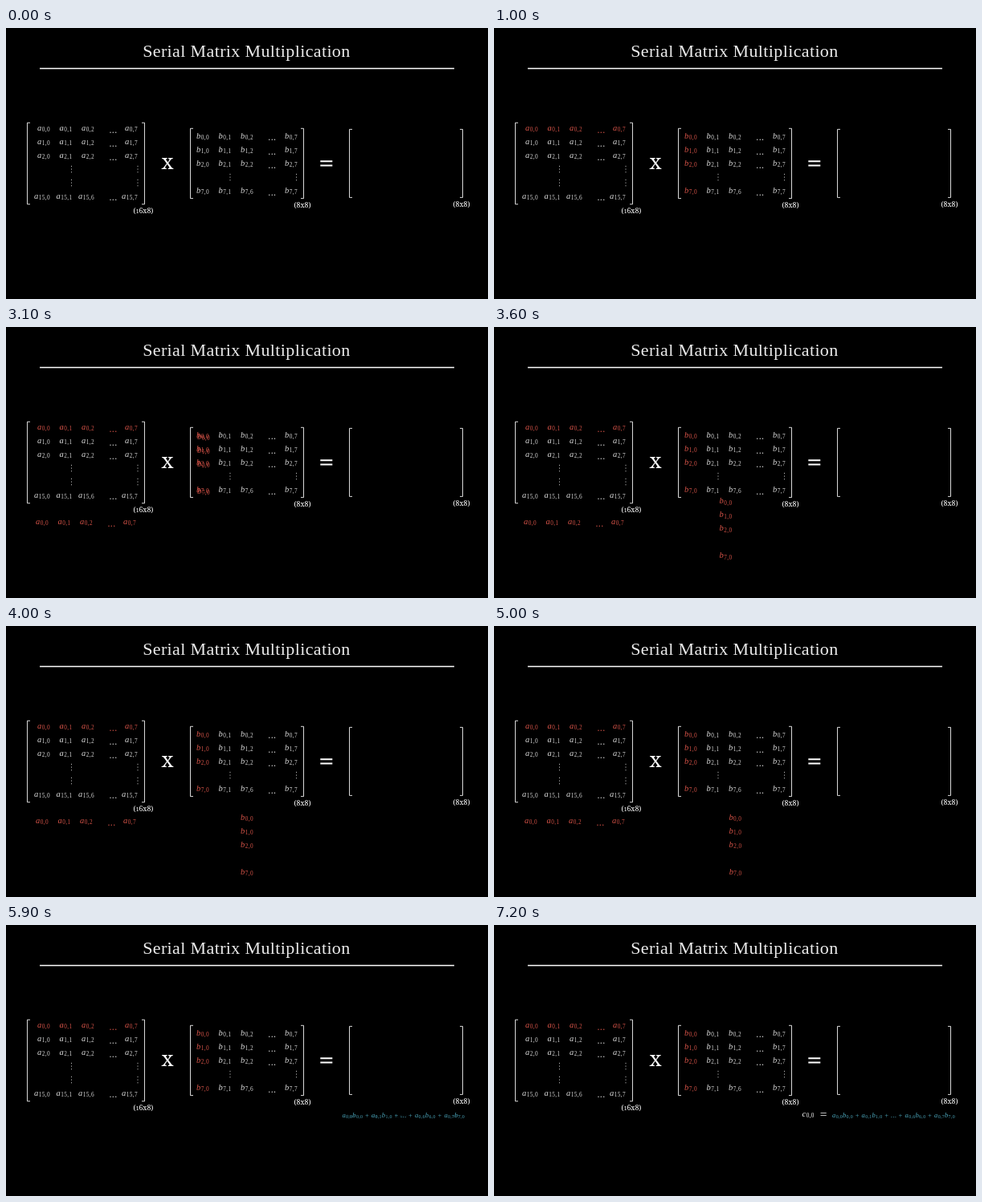
Recreate the animation shown at these times as an HTML page. Size 600 px wide and 338 px high, loop 8 s.

```html
<!DOCTYPE html>
<html lang="en">
<head>
<meta charset="utf-8">
<title>Serial Matrix Multiplication</title>
<style>
  html, body { margin: 0; width: 100%; height: 100%; overflow: hidden; background: #000; }
  svg { display: block; width: 100vw; height: 100vh; }
  :root { --ease: cubic-bezier(.65, 0, .35, 1); }
  svg {
    --red: #fc6255; --blue: #58c4dd;
    fill: #fff; font-family: "Liberation Serif", serif;
  }
  text { text-anchor: middle; }
  .title { font-size: 22px; letter-spacing: .37px; fill-opacity: .92; }
  .term { font-size: 10.5px; letter-spacing: .4px; fill-opacity: .85; }
  .dots { font-size: 12px; letter-spacing: .3px; fill-opacity: .85; }
  .sum .term { font-size: 8.6px; letter-spacing: .3px; }
  .sum .dots { font-size: 9px; }
  .i { font-style: italic; }
  .s { font-size: .69em; }
  .size { font: 500 8.8px "Noto Serif", serif; }
  .times { font: 500 26px "Noto Serif", serif; }
  .line { fill: none; stroke: #fff; }
  .bracket { stroke-width: .85; }
  .vdots { stroke: #fff; stroke-width: 1.1; stroke-linecap: round; stroke-dasharray: 0 3.8; }

  .tint, .row, .col, .sum { animation: 8s infinite var(--ease); }
  .tint { animation-name: tint; }
  .row { animation-name: row; }
  .col { animation-name: col; }
  .sum { animation-name: form; }
  .ink {
    animation: 8s infinite var(--ease);
    stroke: #fff; stroke-width: .4px; stroke-dasharray: 30 30;
  }

  @keyframes tint {
    0% { fill: #fff; }
    12.125%, 100% { fill: var(--red); }
  }
  @keyframes row {
    0%, 24.62% { opacity: 0; transform: translate(0, 0) scale(1); fill: var(--red); }
    24.625% { opacity: 1; transform: translate(0, 0) scale(1); }
    37.125%, 62.125% { opacity: 1; transform: translate(-2px, 118px) scale(1); fill: var(--red); }
    74.62% { opacity: .25; transform: translate(var(--x), var(--y)) scale(.5); fill: var(--blue); }
    74.625%, 100% { opacity: 0; }
  }
  @keyframes col {
    0%, 37.12% { opacity: 0; transform: translate(0, 0) scale(1); fill: var(--red); }
    37.125% { opacity: 1; transform: translate(0, 0) scale(1); }
    49.625%, 62.125% { opacity: 1; transform: translate(55px, 104px) scale(1); fill: var(--red); }
    74.62% { opacity: .25; transform: translate(var(--x), var(--y)) scale(.5); fill: var(--blue); }
    74.625%, 100% { opacity: 0; }
  }
  @keyframes form {
    0%, 62.125% { opacity: 0; transform: translate(var(--x), var(--y)) scale(.4); fill: var(--red); }
    74.625%, 100% { opacity: 1; transform: translate(0, 0) scale(1); fill: var(--blue); }
  }
</style>
</head>
<body>
<svg id="stage" viewBox="0 0 600 338"></svg>
<script>
const SUM_Y = 239.5;

// Sigmoid easing, rescaled to run from 0 to 1
const sigmoid = t => 1 / (1 + Math.exp(10 * (0.5 - t)));
const smooth = t => (sigmoid(t) - sigmoid(0)) / (sigmoid(1) - sigmoid(0));
const ease = `linear(${Array.from({ length: 41 }, (_, k) => smooth(k / 40).toFixed(4))})`;
if (CSS.supports('animation-timing-function', ease)) {
  document.documentElement.style.setProperty('--ease', ease);
}

const sub = (name, index, back = '') =>
  `<tspan class="i"${back}>${name}</tspan><tspan class="s" dy=".2em">${index}</tspan>`;
const term = (name, index, x, y) => `<text class="term" x="${x}" y="${y}">${sub(name, index)}</text>`;
const dots = (x, y) => `<text class="dots" x="${x}" y="${y}">...</text>`;
const vdots = (x, y) => `<path class="vdots" d="M${x} ${y - 3.8}v7.7"/>`;
const label = (cls, text, x, y) => `<text class="${cls}" x="${x}" y="${y}">${text}</text>`;
const tinted = body => `<g class="tint">${body}</g>`;

function bracket(left, right, top, bottom) {
  const half = (x, dir) => `M${x + 3.5 * dir} ${top}H${x}V${bottom}h${3.5 * dir}`;
  return `<path class="line bracket" d="${half(left, 1)}${half(right, -1)}"/>`;
}

// A part placed at (x, y) whose animation ends or begins at an offset (dx, dy)
const mover = (cls, x, y, dx, dy, body) =>
  `<g transform="translate(${x} ${y})"><g class="${cls}" style="--x:${dx}px;--y:${dy}px">${body}</g></g>`;

const aCols = [47, 74.5, 102, 156], bCols = [245, 272.5, 300, 355];
const aRows = [[0, 128], [1, 145], [2, 162], [15, 213]];
const bRows = [[0, 137.8], [1, 155], [2, 172], [7, 206]];
const colIndex = (r, c) => c === 3 ? 7 : c === 2 && r > 2 ? 6 : c;

function matrixA() {
  return aRows.map(([r, y]) => {
    const shift = r === 15 ? -2 : 0;
    const cells = aCols.map((x, c) => term('a', `${r},${colIndex(r, c)}`, x + shift, y)).join('');
    const line = cells + dots(133.5, y + (r === 15 ? 2 : 3));
    return r ? line : tinted(line);
  }).join('') + [176, 193].map(y => vdots(81.5, y) + vdots(164, y)).join('');
}

function matrixB() {
  return bRows.map(([r, y]) => bCols.map((x, c) => {
    const cell = term('b', `${r},${colIndex(r, c)}`, x, y);
    return c ? cell : tinted(cell);
  }).join('') + dots(331.3, y + 2.6)).join('') + vdots(279, 186) + vdots(361.5, 186);
}

// The sum in five chunks, one for each part of the moving row
const pair = (k, x) =>
  `<text class="term" x="${x}">${sub('a', '0,' + k)}${sub('b', k + ',0', ' dy="-.138em"')}</text>`;
const plus = x => label('term', '+', x, 0);
const chunks = [
  [434, pair(0, 0)],
  [466, plus(-13.8) + pair(1, 4.5)],
  [497.5, plus(-8.8) + dots(0, 0) + plus(8.7)],
  [530, pair(6, -5.5) + plus(12.7)],
  [561, pair(7, 0)]
];

function moving() {
  const parts = [...aCols.slice(0, 3), 133.5, aCols[3]];
  const row = parts.map((x, k) => {
    const body = k === 3 ? dots(0, 3) : term('a', `0,${k === 4 ? 7 : k}`, 0, 0);
    const [cx, text] = chunks[k];
    return mover('row', x, 128, cx - x, SUM_Y - 128, body) +
      mover('sum', cx, SUM_Y, x - 2 - cx, 246 - SUM_Y, text);
  });
  const ends = [429, 459, 489, 563];
  const col = bRows.map(([r, y], k) =>
    mover('col', bCols[0], y, ends[k] - bCols[0], SUM_Y - y, term('b', r + ',0', 0, 0)));
  return row.join('') + col.join('');
}

// Each glyph is outlined, then filled, one after another
const inkRules = [];
function ink(start) {
  const pct = ms => ms / 80 + '%';
  const name = 'ink' + inkRules.length;
  inkRules.push(`@keyframes ${name} {
    0%, ${pct(start)} { fill-opacity: 0; stroke-opacity: 1; stroke-dashoffset: 30; }
    ${pct(start + 278)} { fill-opacity: 0; stroke-opacity: 1; stroke-dashoffset: 0; }
    ${pct(start + 556)}, 100% { fill-opacity: 1; stroke-opacity: 0; stroke-dashoffset: 0; }
  }`);
  return `class="ink" style="animation-name:${name}"`;
}

function result() {
  const subs = ['0', ',', '0'].map((ch, k) =>
    `<tspan font-size="7.2"${k ? '' : ' dy="1.45"'} ${ink(6081 + 111 * k)}>${ch}</tspan>`).join('');
  return `<text class="term" x="391.2" y="239"><tspan font-style="italic" ${ink(5970)}>c</tspan>${subs}</text>` +
    `<text x="410" y="241.4" font-size="15.5"><tspan ${ink(6414)}>=</tspan></text>`;
}

document.getElementById('stage').innerHTML =
  label('title', 'Serial Matrix Multiplication', 299.4, 36) +
  '<path class="line" stroke-width="1.5" d="M42 50.4H558"/>' +
  bracket(26.5, 172.5, 118.2, 219.8) + bracket(229.5, 370.5, 125.3, 212.6) + bracket(427.5, 568.5, 126.4, 211.4) +
  matrixA() + matrixB() +
  label('times', 'x', 201, 176) +
  '<path class="line" stroke-width="2" d="M391.3 166.2h15M391.3 171.5h15"/>' +
  label('size', '(<tspan font-size="6.8">1</tspan>6x8)', 171, 231) +
  label('size', '(8x8)', 369, 224) + label('size', '(8x8)', 567, 222.5) +
  moving() + result();

const style = document.createElement('style');
style.textContent = inkRules.join('\n');
document.head.append(style);
</script>
</body>
</html>
```
